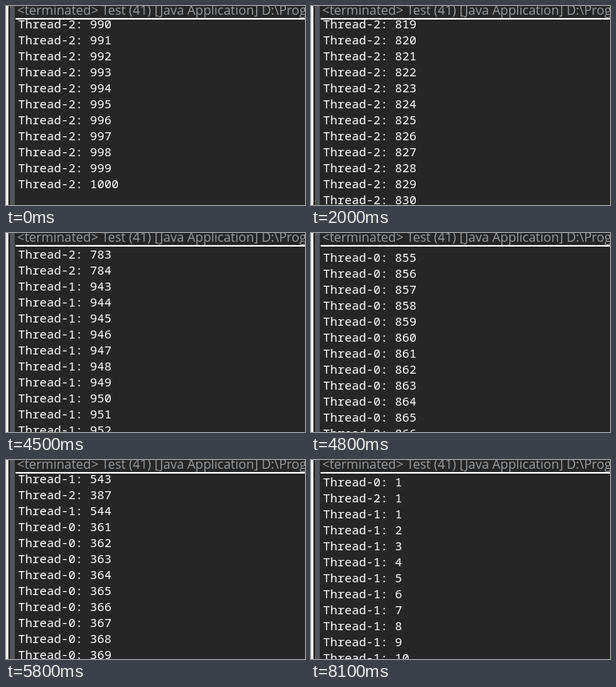
Animation, 374 px wide and 249 px high, one loop 8200 ms. Source, as an HTML page with a canvas:

```html
<!DOCTYPE html>
<html lang="en">
<head>
<meta charset="utf-8">
<title>Console scroll</title>
<style>
  html, body { margin: 0; width: 100%; height: 100%; overflow: hidden; background: #262626; }
  canvas { display: block; }
</style>
</head>
<body>
<canvas width="374" height="249"></canvas>
<script>
const ctx = document.querySelector('canvas').getContext('2d');
const LOOP = 8200, ROW = 20, TOP = 17, LEFT = 15;
const DRAG_START = 4500, DRAG_END = 6500, NOTCH = 3 * ROW;

// Threads take turns; each run is a thread and the number it counts up to.
const runs = [
  [0, 1], [2, 1], [1, 542], [2, 386], [0, 360], [1, 543], [2, 387], [1, 544], [0, 620],
  [2, 545], [1, 733], [2, 782], [0, 1000], [1, 942], [2, 784], [1, 1000], [2, 1000]
];
const lines = [];
const counts = [0, 0, 0];
for (const [id, last] of runs) {
  while (counts[id] < last) lines.push(`Thread-${id}: ${++counts[id]}`);
}

const lineOf = (id, n) => lines.indexOf(`Thread-${id}: ${n}`);
const scrollTo = (id, n, offset) => lineOf(id, n) * ROW + offset;

// The view moves every 100 ms within each burst.
const bursts = [
  [0, 0], [400, 400], [600, 600], [800, 1300], [1500, 1700], [1900, 2000], [2200, 2500],
  [2700, 2700], [2900, 2900], [3200, 3200], [DRAG_START, 5300], [5500, DRAG_END]
];
const moves = bursts.flatMap(([from, to]) =>
  Array.from({ length: (to - from) / 100 + 1 }, (_, i) => from + i * 100));
const moveAt = t => moves.findLastIndex(ms => ms <= t);

// Known positions; moves between two of them are equally long.
const start = scrollTo(2, 990, 5);
const keys = [
  [0, start],
  [2000, scrollTo(2, 819, 5)],
  [3200, scrollTo(1, 955, 5)],
  [DRAG_START, scrollTo(2, 783, 1)],
  [5200, scrollTo(1, 731, 4)],
  [5800, scrollTo(1, 543, 4)],
  [DRAG_END, 0]
].map(([ms, y]) => [moveAt(ms), y]);

function scrollAt(t) {
  const move = moveAt(t);
  const k = Math.min(keys.findLastIndex(([m]) => m <= move), keys.length - 2);
  const [m0, y0] = keys[k], [m1, y1] = keys[k + 1];
  const y = y0 + (y1 - y0) * (move - m0) / (m1 - m0);
  // The wheel turns in whole notches, the scrollbar moves freely.
  const unit = t < DRAG_START ? NOTCH : 1;
  return start - Math.round((start - y) / unit) * unit;
}

function rect(color, x, y, w, h) {
  ctx.fillStyle = color;
  ctx.fillRect(x, y, w, h);
}

function drawFrame() {
  rect('#262626', 0, 0, 374, 249);
  rect('#f4f4f4', 0, 0, 3, 249);
  rect('#515658', 5, 0, 6, 249);
  ctx.fillStyle = '#989ca0';
  ctx.font = '16px "Open Sans", sans-serif';
  ctx.fillText('<terminated> Test (41) [Java Application] D:\\Prog', 14, 11);
  rect('#ffffff', 12, 15, 362, 2);
}

function drawConsole(t) {
  const scroll = scrollAt(t);
  ctx.save();
  ctx.beginPath();
  ctx.rect(12, TOP, 362, 249 - TOP);
  ctx.clip();
  ctx.fillStyle = '#ffffff';
  ctx.font = '15px "Noto Sans Mono", monospace';
  const first = Math.floor(scroll / ROW);
  lines.slice(first, first + 13).forEach((line, i) =>
    ctx.fillText(line, LEFT, TOP + (first + i) * ROW - scroll + 16));
  ctx.restore();
  const caretOn = (t >= DRAG_END && t < 7000) || (t >= 7600 && t < 8100);
  if (caretOn) rect('#ffffff', LEFT, TOP, 1, ROW);
}

function tick() {
  drawFrame();
  drawConsole(performance.now() % LOOP);
  requestAnimationFrame(tick);
}
tick();
</script>
</body>
</html>
```
